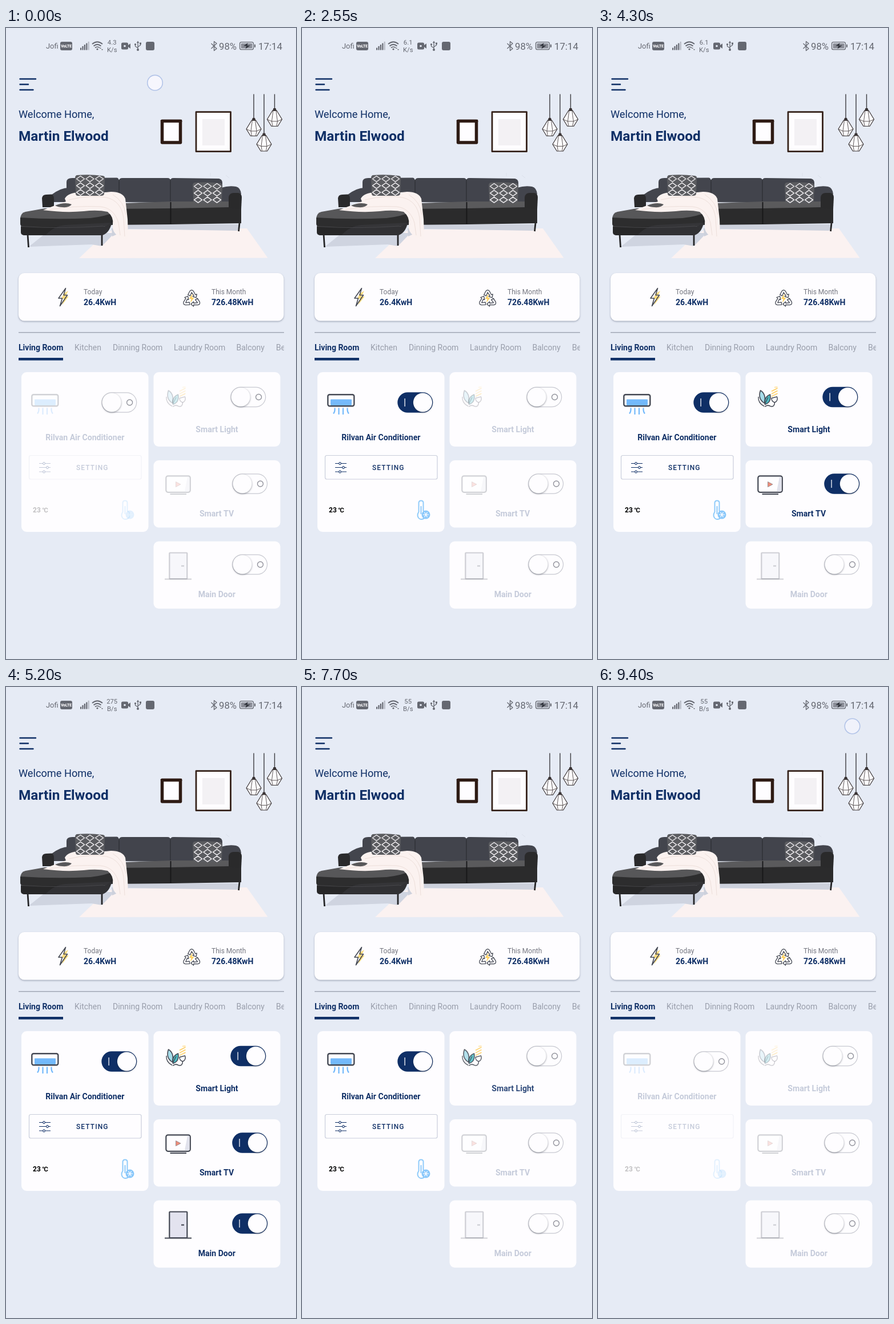
Write an HTML page with a canvas that moves like this. It is 508x1102 px and loops after 9.45 s.

```html
<!DOCTYPE html>
<html lang="en">
<head>
<meta charset="utf-8">
<title>Smart home</title>
<style>
html, body { margin: 0; width: 100%; height: 100%; overflow: hidden; background: #e6ebf5; }
canvas { display: block; width: 508px; height: 1102px; }
</style>
</head>
<body>
<canvas id="stage" width="508" height="1102"></canvas>
<script>
const LOOP = 9450;
const NAVY = '#0f2f66', INK = '#454954', WHITE = '#fefdff', GREY = '#656871', BLUE = '#73b9fb';
const c = document.getElementById('stage').getContext('2d');

const clamp = v => Math.max(0, Math.min(1, v));
const ramp = (t, from, length) => clamp((t - from) / length);
const easeOut = v => 1 - (1 - v) ** 2;
const mix = (a, b, p) => a + (b - a) * p;

function paint(path, fill, stroke, width) {
  if (fill) { c.fillStyle = fill; c.fill(path); }
  if (stroke) { c.strokeStyle = stroke; c.lineWidth = width; c.stroke(path); }
}
function shape(d, fill, stroke, width = 1) {
  paint(new Path2D(d), fill, stroke, width);
}
function box(x, y, w, h, r, fill, stroke, width = 1) {
  const path = new Path2D();
  path.roundRect(x, y, w, h, r);
  paint(path, fill, stroke, width);
}
function disc(x, y, r, fill, stroke, width = 1) {
  const path = new Path2D();
  path.arc(x, y, r, 0, 7);
  paint(path, fill, stroke, width);
}
function text(s, x, y, size, color, weight = 400, align = 'left', spacing = 0) {
  c.font = `${weight} ${size}px Roboto, "Noto Sans CJK SC", sans-serif`;
  c.letterSpacing = spacing + 'px';
  c.textAlign = align;
  c.fillStyle = color;
  c.fillText(s, x, y);
}
function group(draw, x = 0, y = 0, alpha = 1) {
  c.save();
  c.translate(x, y);
  c.globalAlpha *= alpha;
  draw();
  c.restore();
}

const SPEEDS = [[0, '4.3', 'K/s'], [1450, '6.1', 'K/s'], [4350, '275', 'B/s'], [7250, '55', 'B/s']];

function statusBar(t) {
  text('Jofi', 70, 36, 12.9, GREY);
  box(95, 24, 21, 15, 3, GREY);
  text('VoLTE', 105.5, 34.3, 6.6, WHITE, 900, 'center');
  for (let i = 0; i < 5; i++) {
    const h = 4 + i * 2.7;
    box(130 + i * 3.4, 38.5 - h, 2.2, h, .5, i < 4 ? GREY : '#b6bac4');
  }
  shape('M151 28Q160 20.5 169 28M153.5 31.5Q160 26 166.5 31.5M156 34.5Q160 31.5 164 34.5', null, GREY, 1.7);
  disc(160, 37, 1.6, GREY);
  shape('M164 36L165.5 34L167 36ZM167 37L168.5 39L170 37Z', GREY);

  const [, rate, unit] = SPEEDS.filter(s => s[0] <= t).pop();
  text(rate, 185.7, 28.7, 11.3, GREY, 400, 'center');
  text(unit, 185.7, 42, 11.3, GREY, 400, 'center');

  box(202, 25.5, 12, 12, 2.5, GREY);
  shape('M214 30L218 27V36L214 33Z', GREY);
  disc(208, 31.5, 1.8, '#e6ebf5');
  shape('M231 25V38M231 35L226.5 32V29M231 33L235.5 30V27', null, GREY, 1.3);
  shape('M228.8 26L231 22.5L233.2 26Z', GREY);
  disc(231, 38, 2, GREY);
  disc(226.5, 28.5, 1.6, GREY);
  box(234, 25.5, 3, 3, 0, GREY);
  box(245, 24, 15, 15, 3, GREY);

  shape('M359.5 27L369 36L364.5 39.5V23.5L369 27L359.5 36', null, GREY, 1.3);
  text('98%', 373, 37.5, 16.7, GREY);
  box(409.5, 24.7, 24, 13, 3, null, GREY, 1.3);
  box(411.5, 26.7, 20, 9, 1.5, '#8b8e98');
  box(435, 28.5, 2, 5.5, 1, GREY);
  shape('M423.5 26L416 31.5H421L419.5 36.5L428 30.5H422.5Z', '#33363f');
  text('17:14', 442, 37.5, 16.9, GREY);
}

function lamp(x, y, top) {
  group(() => {
    shape(`M0 ${top - y}V0`, null, '#3a3a3e', 1.4);
    shape('M-3.5 4L-13 19.5L-5.5 31.5H5.5L13 19.5L3.5 4Z', WHITE, '#3a3435', 1.2);
    shape('M-13 19.5L-5 23H5L13 19.5M-2.5 4L-5 23L-3.5 31M2.5 4L5 23L3.5 31', null, '#4a4343', .9);
    shape('M-2 0H2L3.5 5H-3.5Z', '#3a3435');
  }, x, y);
}

function pillow(x, y, w, h) {
  group(() => {
    const d = `M3 1Q${w / 2} -1 ${w - 4} 2Q${w + 1} 2 ${w} 8L${w - 1} ${h - 3}Q${w - 2} ${h} ${w - 6} ${h}L4 ${h}Q0 ${h - 1} 1 ${h - 8}L0 6Q0 2 3 1Z`;
    shape(d, '#5b5c60');
    c.clip(new Path2D(d));
    for (let row = 0; row < 3; row++)
      for (let col = 0; col < 3; col++) {
        const cx = w / 2 + (col - 1) * 16.5, cy = 7.5 + row * 11.8;
        shape(`M${cx - 7} ${cy}L${cx} ${cy - 5}L${cx + 7} ${cy}L${cx} ${cy + 5}Z`, null, '#ebe9ec', 1.5);
      }
  }, x, y);
}

function room() {
  box(273.5, 162.5, 32, 37.5, 0, WHITE, '#2e1b14', 5.5);
  shape('M270.5 161L308 160L308.5 164L271 163Z', '#2e1b14');
  box(333, 146.7, 60.5, 69, 0, WHITE, '#35221a', 2.8);
  box(344, 159, 39, 46, 0, '#f3f1f4');
  lamp(434, 157, 115.5);
  lamp(452, 183.5, 115.5);
  lamp(470.5, 140, 115.5);

  shape('M187 352L422 350L458.5 401.5L128 402L166 366Z', '#fbf2f1');
  shape('M40 382L70 358H190L168 381L150 378Z', '#cfd4e0');
  shape('M185 350L214 343H410L405 354L215 351L186 364Z', '#cdd1dc');
  shape('M38 361L39.5 383M168 360L168 380M409 341L407.5 355', null, '#242426', 2.8);

  // back and arms
  shape('M80 291Q96 279 110 279L125 304H84Z', '#43454d');
  shape('M106 300V269Q106 262 116 262L194 261.5Q198 262 198 268V306H106Z', '#43454d');
  shape('M198 304V267Q198 262 204 262H283Q288 262 288 267V305Z', '#42444c');
  shape('M288 305V267Q288 261.5 294 262L373 263Q379 264 379 271V305Z', '#42444c');
  shape('M198 265V304M288 264V305', null, '#2c2d32', 1.2);
  shape('M63 297Q64 291 70 291L80 290.5Q84 292 84 298V313H64Z', '#2a2a2c');
  shape('M377 279Q390 275 403 277Q411 279 412 290L391 306H377Z', '#43454d');

  // seats
  shape('M180 307L288 303L392 303V316L180 318Z', '#5a5a5c');
  shape('M180 316L288 315L391 313L412 300L412 341L289 343L180 344Z', '#2b2b2c');
  shape('M390 314V296Q391 288 399 288L407 288Q413 289 413 296L412 316Z', '#2a2a2b');
  shape('M288.5 304V342', null, '#161617', 1.8);

  // chaise
  shape('M25 334Q25 323 34 321L68 315H196L187 334L150 341H28Z', '#575759');
  shape('M25 331Q85 335 148 332Q174 329 189 322Q188 345 170 347H31Q25 347 25 342Z', '#2d2d2e');
  shape('M26 347H170Q181 345 186 335Q183 357 169 362H31Q26 361 26 357Z', '#272728');
  shape('M26 346.5Q100 351 170 346', null, '#47474a', 1);
  shape('M70 361Q84 346 104 344L186 340Q181 358 169 362Z', 'rgba(70,70,74,.35)');

  // blanket
  shape('M65 318Q90 308 105 303L103 298Q108 288 128 287Q160 289 184 286Q204 286 209 298L213 334L214 366Q208 371 200 365Q185 358 187 343Q189 330 178 321Q160 317 136 320Q103 323 65 318Z', '#fbf2f0');
  shape('M76 317Q120 310 165 312Q189 314 197 340L200 362M110 300Q150 291 176 296Q202 302 206 332L208 364M187 291Q207 303 210 326', null, '#eddfda', 1);
  shape('M86 310Q103 303 115 308Q111 314 99 313Q91 313 86 310Z', '#58585a');
  pillow(121, 256, 52, 37);
  pillow(327, 269, 52, 37);
  shape('M385 257L391 262M358 253V259', null, '#dbe0ea', 1);
}

function energy() {
  group(() => {
    c.shadowColor = 'rgba(80,90,115,.45)';
    c.shadowBlur = 3;
    c.shadowOffsetY = 1.5;
    box(22, 428, 464.5, 83.5, 10, WHITE);
  });
  shape('M101 464L109 459L104 469L109.5 469L98 484L102 473H97Z', '#ffdb7c');
  shape('M104.5 454.5L92 472H98.5L94.5 485.5L107.5 466.5H101Z', null, INK, 1.6);
  text('Today', 136, 465, 12, '#73757f');
  text('26.4KwH', 136, 484, 14.1, NAVY, 700);
  for (let i = 0; i < 3; i++) {
    group(() => {
      c.rotate(i * Math.PI * 2 / 3);
      shape('M-2.5 -6L-6.5 -8L-3 -14.5Q0 -18 3 -14.5L6.5 -8L9 -9L8 -3L2 -5L4 -6.5L0 -12Z', WHITE, INK, 1.3);
    }, 325.2, 473.8);
  }
  shape('M327 464L320.5 473H324.5L323 480L329.5 471H325.5Z', '#ffd263');
  text('This Month', 360, 465, 12, '#73757f');
  text('726.48KwH', 360, 484, 14.1, NAVY, 700);
}

function tabs() {
  box(22, 531, 465, 1.6, 0, '#a2a8b6');
  group(() => {
    c.beginPath();
    c.rect(22, 540, 465, 45);
    c.clip();
    text('Living Room', 22, 562.5, 14, NAVY, 700);
    [['Kitchen', 120], ['Dinning Room', 187], ['Laundry Room', 294], ['Balcony', 403.5], ['Bedroom', 473]]
      .forEach(([s, x]) => text(s, x, 562.5, 14, '#999eab'));
    box(22, 576, 78, 4.5, 0, NAVY);
  });
}

function airUnit() {
  box(45.3, 640.3, 46, 20, 3, WHITE, INK, 2.4);
  box(50, 648.5, 37, 10.5, 1, BLUE);
  shape('M64.5 663.5V675M72 663.5V675M57.5 663.5Q58 670 55 673.5M79.5 663.5Q79 670 82 673.5', null, BLUE, 2.2);
  text('Rilvan Air Conditioner', 138.3, 719.5, 14.1, NAVY, 700, 'center');
  box(40.5, 746.5, 196.5, 41.5, 3, null, '#c9cedb', 1.2);
  shape('M58 760.5H65M68 760.5H78M58 767.5H71M74 767.5H78M58 775H65M68 775H78', null, NAVY, 1.1);
  [[65, 758.5], [71, 765.5], [65, 773]].forEach(([x, y]) => box(x, y, 3, 4, .5, null, NAVY, 1));
  text('SETTING', 123, 772, 12, NAVY, 500, 'left', 1.1);
  text('23', 47, 846, 12, '#000', 700);
  text('℃', 63.5, 846, 11.5, '#000', 700);
  shape('M204.5 845V829Q205 825.5 208.5 825.5Q212.5 825.5 212.5 829V843Q218 847 216.5 853Q214 858 208.5 858Q203 857 202.5 851Q202.5 848 204.5 845Z', WHITE, '#8fcbfa', 2);
  shape('M208.5 835V849', null, '#8fcbfa', 2);
  disc(217, 850, 7.5, '#8ac8fa');
  for (let a = 0; a < 3; a++) {
    const x = 5 * Math.cos(a * Math.PI / 3), y = 5 * Math.sin(a * Math.PI / 3);
    shape(`M${217 - x} ${850 - y}L${217 + x} ${850 + y}`, null, WHITE, 1.2);
  }
}

function light() {
  shape('M284.5 633Q295 639 291.5 655Q279.500 648 284.5 633Z', '#a5dbe8', INK, 1.6);
  shape('M301.5 640Q304 654 292.5 657.5Q290 645 301.5 640Z', '#4cbcc4', INK, 1.6);
  shape('M281 644Q280 655 291 660.5M298 645L292.5 656', null, INK, 1.4);
  for (let i = 0; i < 3; i++)
    shape(`M304 ${634.5 + i * 4.5}L314.5 ${629 + i * 4.5}`, null, '#ffd067', 1.9);
  shape('M305 643L314 639M309 627.5L314.5 627', null, '#ffdc90', 1.4);
  shape('M304 646.5L313.5 644Q316 651 309.5 654Q304 652.5 304 646.5Z', WHITE, INK, 1.5);
  shape('M309.5 654Q309 662 303 661Q297 657 292 661.5', null, INK, 1.5);
  text('Smart Light', 369.5, 705.5, 14.1, NAVY, 700, 'center');
}

function tv() {
  box(280.3, 782.3, 42.5, 28.5, 3.5, WHITE, INK, 2.2);
  shape('M318 784H321.5V809H313Z', '#e1e2ec');
  shape('M297.5 792.5L306 797L297.5 801.5Z', '#ee8c79', '#8a8288', .8);
  shape('M287.5 814H316', null, INK, 2);
  text('Smart TV', 369, 853, 14.1, NAVY, 700, 'center');
}

function door() {
  box(286.3, 916.5, 31, 45.5, 1, '#e3e3ef', INK, 2.2);
  shape('M278 962.5H325', null, INK, 2.2);
  shape('M307 939.5H312', null, INK, 2.2);
  text('Main Door', 369.3, 994, 14.1, NAVY, 700, 'center');
}

// Each device: card rectangle, toggle centre, tap times and content.
const DEVICES = [
  { card: [27, 601, 222.5, 279], x: 198.3, y: 654, on: 2035, off: 8170, draw: airUnit },
  { card: [258.5, 601, 222, 130], x: 424.3, y: 644.5, on: 2815, off: 7360, draw: light },
  { card: [258.5, 755, 222, 117.5], x: 427.2, y: 796, on: 3590, off: 6555, draw: tv },
  { card: [258.5, 896.5, 222, 117.5], x: 427.2, y: 937, on: 4380, off: 5730, draw: door }
];

// Pressing thickens the rim and stretches the thumb, then the thumb slides.
function toggle(p, press) {
  const w = 62, h = 35.6, grow = Math.max(p, press);
  const rim = 1.2 + (h / 2 - 1.2) * grow;
  const rgb = [200, 201, 209].map((v, i) => Math.round(mix(v, [15, 47, 102][i], p)));
  box(-w / 2, -h / 2, w, h, h / 2, `rgb(${rgb})`);
  if (rim < h / 2) box(-w / 2 + rim, -h / 2 + rim, w - 2 * rim, h - 2 * rim, h / 2 - rim, WHITE);
  c.globalAlpha = 1 - p;
  disc(18.3, 0, 5, null, '#92939c', 1.4);
  c.globalAlpha = p;
  box(-18.8, -7, 1.3, 14, 0, WHITE);
  c.globalAlpha = 1;
  const r = 16.6, extra = 8 * press;
  const left = mix(-13.2, 13.2, p) - r - extra * p;
  c.shadowColor = 'rgba(40,45,60,.5)';
  c.shadowBlur = 3;
  c.shadowOffsetY = 1;
  box(left, -r, 2 * r + extra, 2 * r, r, WHITE);
}

function pointer(x, y, alpha, fill = '#f6f6fd') {
  group(() => disc(x, y, 13.3, fill, '#b3c4e8', 1.6), 0, 0, alpha);
}

function device(d, t) {
  const tap = t < (d.on + d.off) / 2 ? d.on : d.off;
  const age = t - tap, turn = v => tap === d.on ? v : 1 - v;
  const p = turn(easeOut(ramp(age, 100, 200)));
  const active = turn(ramp(age, 300, 220));
  const press = Math.max(0, Math.min(age, 200 - age)) / 300;
  box(...d.card, 9, WHITE);
  group(d.draw, 0, 0, mix(.24, 1, active));
  group(() => toggle(p, press), d.x, d.y);
  if (age >= 0 && age < 130) pointer(d.x + 3, d.y, .65 * (1 - ramp(age, 90, 40)), '#e9eefa');
}

function render(t) {
  c.fillStyle = '#e6ebf5';
  c.fillRect(0, 0, 508, 1102);
  statusBar(t);
  c.lineCap = 'round';
  shape('M24.5 89H52M24.5 98.5H39M24.5 108H47.5', null, NAVY, 2.4);
  c.lineCap = 'butt';
  text('Welcome Home,', 22, 157, 18.2, NAVY);
  text('Martin Elwood', 22, 197, 24.4, NAVY, 700);
  room();
  energy();
  tabs();
  DEVICES.forEach(d => device(d, t));
  if (t < 200) pointer(261, mix(96, 38, ramp(t, 0, 200)), 1 - ramp(t, 50, 150));
  if (t >= 9400) pointer(445.5, 68.5, 1, '#f0f2fb');
}

c.lineJoin = 'round';
const start = performance.now();
function tick() {
  render((performance.now() - start) % LOOP);
  requestAnimationFrame(tick);
}
tick();
</script>
</body>
</html>
```
